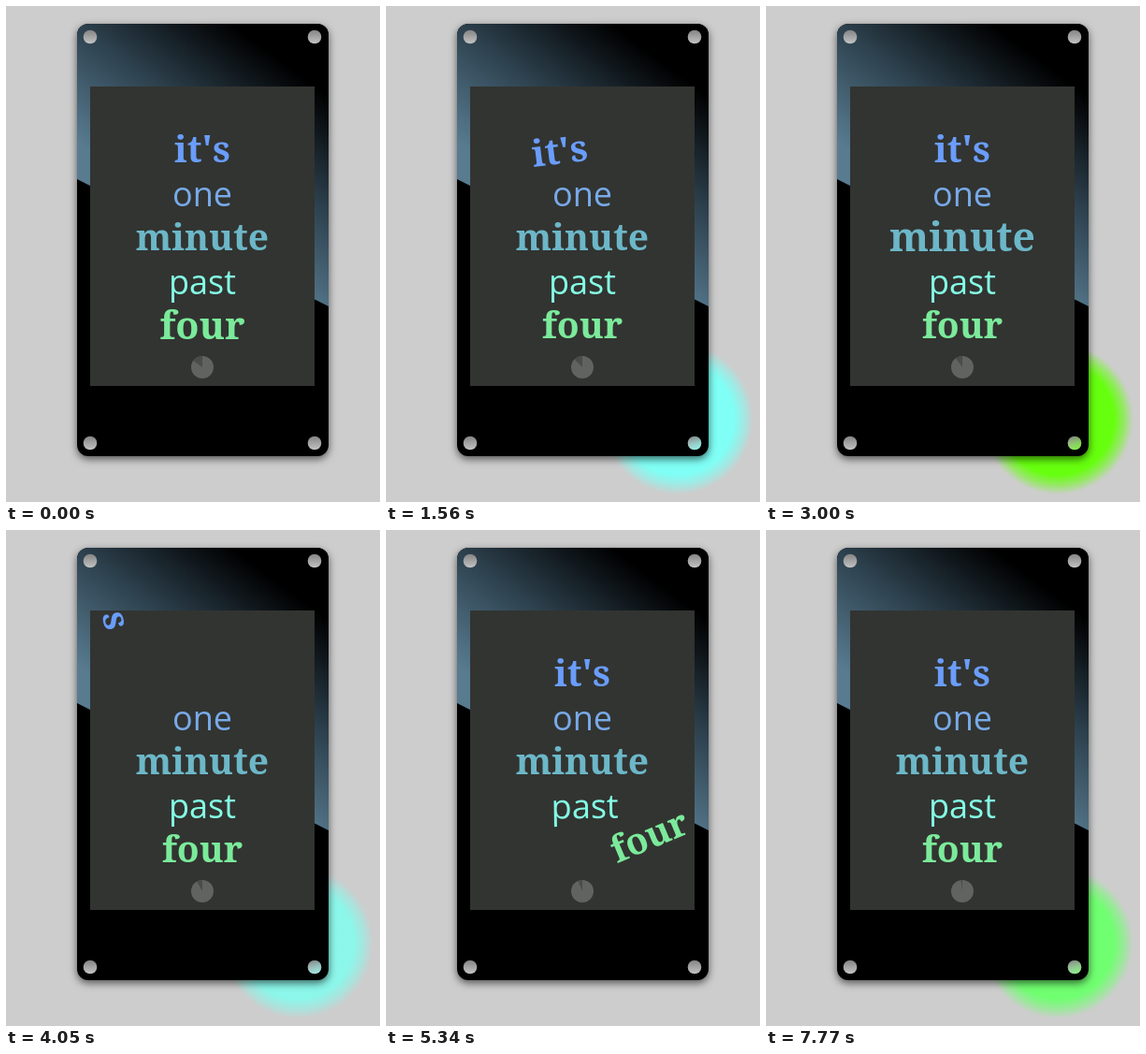
Recreate the animation shown at these times as an HTML page with a canvas. Size 400x530 px, loop 7800 ms.

```html
<!DOCTYPE html>
<html lang="en">
<head>
<meta charset="utf-8">
<title>Word clock</title>
<style>
html, body { margin: 0; width: 400px; height: 530px; overflow: hidden; background: #cdcdcd; }
canvas { display: block; }
</style>
</head>
<body>
<canvas id="stage" width="400" height="530"></canvas>
<script>
const ctx = document.getElementById('stage').getContext('2d');
const LOOP = 7800, BLINK = 1030;
const SERIF = 'bold 39px "Noto Serif", serif';
const SANS = '36px "Open Sans", "Noto Sans", sans-serif';

// Words: text, font, colour, baseline
const words = [
  ["it's", SERIF, '#6a9dfb', 167],
  ['one', SANS, '#78aae9', 214],
  ['minute', SERIF, '#6cb7c8', 261],
  ['past', SANS, '#84ffe6', 308],
  ['four', SERIF, '#7bea9b', 355]
];
const blinkColors = ['#70ff70', '#7ffff5', '#66ff0d', '#7ffff0', '#70ffb0', '#66ff40', '#7fffe0', '#70ff70'];

// Pulses grow a word; swings turn it around a pivot above (-) or below (+).
const moves = [
  { word: 4, start: -400, span: 500, grow: 0.1 },
  { word: 0, start: 850, span: 755, turn: -38, pivot: 200 },
  { word: 2, start: 2750, span: 500, grow: 0.095 },
  { word: 0, start: 3600, span: 1100, turn: 80, pivot: -100 },
  { word: 4, start: 4700, span: 755, turn: -50, pivot: -185 },
  { word: 3, start: 5330, span: 755, turn: -18, pivot: -185 }
];

const clamp = v => Math.max(0, Math.min(1, v));

function disc(x, y, r, fill) {
  ctx.fillStyle = fill;
  ctx.beginPath();
  ctx.arc(x, y, r, 0, 2 * Math.PI);
  ctx.fill();
}

function gradient(x0, y0, x1, y1, ...colors) {
  const g = ctx.createLinearGradient(x0, y0, x1, y1);
  colors.forEach((c, i) => g.addColorStop(i / (colors.length - 1), c));
  return g;
}

function drawGlow(color, alpha) {
  const g = ctx.createRadialGradient(312, 441, 0, 312, 441, 81);
  g.addColorStop(0, color);
  g.addColorStop(0.74, color);
  g.addColorStop(0.87, color + '90');
  g.addColorStop(1, color + '00');
  ctx.globalAlpha = alpha;
  disc(312, 441, 81, g);
  ctx.globalAlpha = 1;
}

function drawCase() {
  ctx.save();
  ctx.shadowColor = 'rgba(0,0,0,.6)';
  ctx.shadowBlur = 8;
  ctx.shadowOffsetY = 3;
  ctx.fillStyle = '#000';
  ctx.beginPath();
  ctx.roundRect(76, 19, 269, 462, 12);
  ctx.fill();
  ctx.restore();

  ctx.save();
  ctx.clip();
  ctx.fillStyle = gradient(288, 54, 168, 214, '#000', '#2d414e', '#587b90');
  ctx.beginPath();
  ctx.moveTo(76, 19);
  ctx.lineTo(345, 19);
  ctx.lineTo(345, 321);
  ctx.lineTo(76, 185);
  ctx.fill();
  ctx.restore();
}

function drawScrews(color, alpha) {
  for (const x of [90, 330]) for (const y of [33, 467])
    disc(x, y, 7.3, gradient(x, y - 7, x, y + 7, '#858585', '#c2c2c2'));
  ctx.globalAlpha = alpha * 0.75;
  disc(330, 467, 7.3, gradient(326, 460, 334, 474, color + '00', color));
  ctx.globalAlpha = 1;
}

function drawWord([text, font, color, base], i, t) {
  const mid = base - 13;
  ctx.save();
  ctx.translate(210, mid);
  for (const m of moves) {
    const u = (t - m.start) / m.span;
    if (m.word !== i || u <= 0 || u >= 1) continue;
    const s = Math.sin(u * Math.PI);
    if (m.grow) ctx.scale(1 + m.grow * s, 1 + m.grow * s);
    else {
      ctx.translate(0, m.pivot);
      ctx.rotate(m.turn * s * Math.PI / 180);
      ctx.translate(0, -m.pivot);
    }
  }
  ctx.font = font;
  ctx.fillStyle = color;
  ctx.fillText(text, 0, base - mid);
  ctx.restore();
}

function drawPie(t) {
  const top = -Math.PI / 2;
  const hand = top + (51 + t / 1000) / 60 * 2 * Math.PI;
  disc(210, 386, 12, '#616361');
  ctx.fillStyle = '#4a4c4a';
  ctx.beginPath();
  ctx.moveTo(210, 386);
  ctx.arc(210, 386, 12, hand, top + 2 * Math.PI);
  ctx.fill();
}

function draw(t) {
  const cycle = Math.floor(t / BLINK), phase = t / BLINK - cycle;
  const color = blinkColors[cycle];
  const alpha = clamp((phase - 0.27) / 0.22) * clamp((1 - phase) / 0.08);

  ctx.fillStyle = '#cdcdcd';
  ctx.fillRect(0, 0, 400, 530);
  drawGlow(color, alpha);
  drawCase();
  drawScrews(color, alpha);

  ctx.save();
  ctx.beginPath();
  ctx.rect(90, 86, 240, 320);
  ctx.clip();
  ctx.fillStyle = '#323431';
  ctx.fillRect(90, 86, 240, 320);
  drawPie(t);
  ctx.textAlign = 'center';
  words.forEach((w, i) => drawWord(w, i, t));
  ctx.restore();
}

const began = performance.now();
function tick() {
  draw((performance.now() - began) % LOOP);
  requestAnimationFrame(tick);
}
tick();
</script>
</body>
</html>
```
